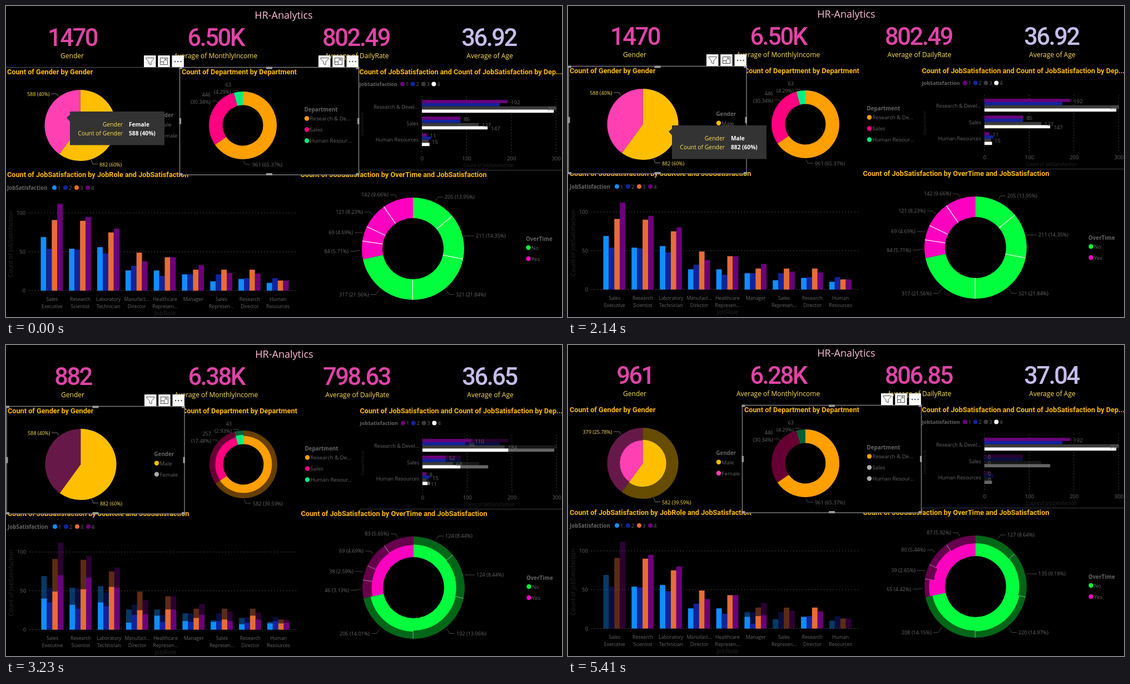
Recreate the animation shown at these times as an HTML page with a canvas. Size 1000x560 px, loop 6500 ms.

```html
<!DOCTYPE html>
<html lang="en">
<head>
<meta charset="utf-8">
<title>HR-Analytics</title>
<style>
  html, body { margin: 0; width: 100%; height: 100%; overflow: hidden; background: #000; }
  canvas { display: block; }
</style>
</head>
<body>
<canvas id="stage" width="1000" height="560"></canvas>
<script>
const ctx = document.getElementById('stage').getContext('2d');
const SANS = '"Open Sans", "Noto Sans", sans-serif';
const DIN = 'Roboto, sans-serif';
const GREY = '#666', DARK = '#262626', YELLOW = '#ffdf55', GOLD = '#ffb90a';
const TAU = Math.PI * 2, TOTAL = 1470, FADE = 0.4;

// Each data set: everyone, women only, and the Research & Development department.
const genders = { all: [882, 588], female: [0, 588], rd: [582, 379] };
const departments = { all: [961, 446, 63], female: [379, 189, 20], rd: [961, 0, 0] };
const overtime = {
  all: [205, 211, 321, 317, 84, 69, 121, 142],
  female: [81, 87, 129, 111, 38, 31, 52, 59],
  rd: [127, 135, 220, 208, 65, 39, 80, 87],
};
const satisfaction = {
  all: [192, 174, 300, 295, 86, 86, 127, 147, 11, 20, 15, 17],
  female: [82, 78, 116, 103, 34, 34, 59, 62, 3, 5, 6, 6],
  rd: [192, 174, 300, 295, 0, 0, 0, 0, 0, 0, 0, 0],
};
const roles = {
  all: [69, 54, 91, 112, 54, 53, 90, 95, 56, 48, 75, 80, 26, 32, 49, 38, 26, 19, 43, 43,
    21, 21, 27, 33, 12, 21, 27, 23, 15, 16, 27, 22, 10, 16, 13, 13],
  female: [29, 19, 42, 42, 22, 26, 38, 28, 21, 18, 20, 26, 17, 13, 24, 18, 8, 9, 17, 17,
    10, 11, 12, 14, 2, 10, 14, 12, 8, 7, 9, 9, 2, 5, 5, 4],
};
const managersInRd = [15, 6, 16, 17];
roles.rd = roles.all.map((v, i) => {
  const role = i >> 2;
  return role === 5 ? managersInRd[i % 4] : [0, 6, 8].includes(role) ? 0 : v;
});
const roleNames = ['Sales Executive', 'Research Scientist', 'Laboratory Technician',
  'Manufact... Director', 'Healthcare Represen...', 'Manager', 'Sales Represen...',
  'Research Director', 'Human Resources'];

const everyone = ['1470', '6.50K', '802.49', '36.92'];
const scenes = [
  { ms: 1050, dx: 0, dy: 0, mode: 'all', selected: 'department', bars: [0, 314], cards: everyone,
    tip: { x: 115, y: 190, w: 170, key: 95, color: YELLOW, rows: [['Gender', 'Female'], ['Count of Gender', '588 (40%)']] } },
  { ms: 1090, dx: -1, dy: -2, mode: 'female', selected: 'gender', bars: [0],
    cards: ['588', '6.69K', '808.27', '37.33'] },
  { ms: 1090, dx: 1, dy: -2, mode: 'all', selected: 'gender', bars: [0], cards: everyone,
    tip: { x: 187, y: 215, w: 170, key: 95, color: YELLOW, rows: [['Gender', 'Male'], ['Count of Gender', '882 (60%)']] } },
  { ms: 1090, dx: 1, dy: 0, mode: 'male', selected: 'gender', bars: [0],
    cards: ['882', '6.38K', '798.63', '36.65'] },
  { ms: 1090, dx: 1, dy: 0, mode: 'all', selected: 'gender', bars: [0, 314], cards: everyone,
    tip: { x: 503, y: 189, w: 267, key: 117, color: '#ddd', rows: [['Department', 'Research & Development'], ['Count of Department', '961 (65.37%)']] } },
  { ms: 1090, dx: 1, dy: -2, mode: 'rd', selected: 'department', bars: [314],
    cards: ['961', '6.28K', '806.85', '37.04'] },
];
const LOOP = scenes.reduce((sum, s) => sum + s.ms, 0);

const pick = (set, mode) =>
  mode === 'male' ? set.all.map((v, i) => v - set.female[i]) : set[mode];
const percent = v => `(${(v / TOTAL * 100).toFixed(2).replace('.00', '')}%)`;

function text(str, x, y, size, color, { align = 'left', weight = 400, family = SANS, spacing = 0 } = {}) {
  ctx.font = `${weight} ${size}px ${family}`;
  ctx.letterSpacing = spacing + 'px';
  ctx.textAlign = align;
  ctx.fillStyle = color;
  ctx.fillText(str, x, y + size * 0.36);
}

function verticalText(str, x, y, size) {
  ctx.save();
  ctx.translate(x, y);
  ctx.rotate(-Math.PI / 2);
  text(str, 0, 0, size, DARK, { align: 'center' });
  ctx.restore();
}

const heading = (str, x, y) => text(str, x, y, 12.7, GOLD, { weight: 600, family: DIN });

function rect(x, y, w, h, color, alpha = 1) {
  ctx.globalAlpha = alpha;
  ctx.fillStyle = color;
  ctx.fillRect(x, y, w, h);
  ctx.globalAlpha = 1;
}

function line(points, color = '#484848', width = 1, dash = []) {
  ctx.beginPath();
  points.forEach(([x, y]) => ctx.lineTo(x, y));
  ctx.strokeStyle = color;
  ctx.lineWidth = width;
  ctx.setLineDash(dash);
  ctx.stroke();
  ctx.setLineDash([]);
}

function dot(x, y, color, r = 4) {
  ctx.beginPath();
  ctx.arc(x, y, r, 0, TAU);
  ctx.fillStyle = color;
  ctx.fill();
}

function legend(title, names, x, y, colors, offset = 0) {
  text(title, x, y, 9.8, GREY, { weight: 700 });
  names.forEach((name, i) => {
    dot(x + 4.5, y + 16 + offset + i * 20, colors[i], 4.2);
    text(name, x + 10, y + 16.5 + offset + i * 20, 9.7, GREY);
  });
}

function numberLegend(x, y, firstDot, step, size, colors) {
  text('JobSatisfaction', x, y, size, GREY, { weight: 700 });
  colors.forEach((color, i) => {
    dot(firstDot + i * step, y - 0.5, color);
    text(i + 1, firstDot + 6 + i * step, y, size, GREY);
  });
}

// Faded full slices with the highlighted share growing from the inner radius.
function ring(cx, cy, inner, outer, all, part, colors, separators = []) {
  const sum = all.reduce((a, b) => a + b);
  const full = all.every((v, i) => v === part[i]);
  const slices = (values, alpha) => {
    let angle = -TAU / 4;
    all.forEach((v, i) => {
      const end = angle + v / sum * TAU;
      const r = inner + (outer - inner) * values[i] / v;
      if (values[i]) {
        ctx.globalAlpha = alpha;
        ctx.beginPath();
        ctx.arc(cx, cy, r, angle, end);
        ctx.arc(cx, cy, inner, end, angle, true);
        ctx.fillStyle = colors[i];
        ctx.fill();
      }
      angle = end;
    });
    angle = -TAU / 4;
    all.forEach((v, i) => {
      angle += v / sum * TAU;
      if (!separators.includes(i) || (!full && alpha === 1)) return;
      const [c, s] = [Math.cos(angle), Math.sin(angle)];
      line([[cx + inner * c, cy + inner * s], [cx + outer * c, cy + outer * s]], '#fff', 1.2);
    });
    ctx.globalAlpha = 1;
  };
  if (!full) slices(all, FADE);
  slices(part, 1);
}

function cards(scene) {
  text('HR-Analytics', 499.5, 17, 18, '#ffc0d4', { align: 'center' });
  const labels = ['Gender', 'Average of MonthlyIncome', 'Average of DailyRate', 'Average of Age'];
  [[119.5, 119], [377, 377], [629.5, 631], [868.5, 870]].forEach(([valueX, labelX], i) => {
    text(scene.cards[i], valueX, 56.5, 43.5, i < 3 ? '#e044a7' : '#c6bcea',
      { align: 'center', family: DIN, weight: 500, spacing: -2.5 });
    text(labels[i], labelX, 90, 12, YELLOW, { align: 'center' });
  });
}

function genderChart({ mode, selected }) {
  const colors = ['#ffbf00', '#ff40b3'];
  const own = mode === 'female' || mode === 'male';
  const part = pick(genders, mode);
  const shown = own ? genders.all : part;
  if (selected === 'gender') selectionBox(0, 110.5, 320, 193.5);
  heading('Count of Gender by Gender', 2, 118.3);
  ring(133.5, 215, 0, 64, genders.all, part, colors);
  const label = v => `${v} ${percent(v)}`;
  text(label(shown[1]), 78.5, 159, 8.9, YELLOW, { align: 'right', weight: 500 });
  line([[81, 158], [91, 158], [94, 163]], '#777');
  text(label(shown[0]), 168, 285.5, 8.9, YELLOW, { weight: 500 });
  line([[153, 277], [156, 284.5], [165, 284.5]], '#777');
  legend('Gender', ['Male', 'Female'], 265.5, 196, colors.map((c, i) => own && !part[i] ? '#aaa' : c), 0.7);
}

function departmentChart({ mode, selected }) {
  const colors = ['#ff9f00', '#ff0080', '#00f080'];
  const own = mode === 'rd';
  const part = pick(departments, mode);
  const shown = own ? departments.all : part;
  if (selected === 'department') selectionBox(312.5, 110.5, 322, 193.5);
  heading('Count of Department by Department', 316, 118.3);
  ring(426, 215, 36.5, 61, departments.all, part, colors);
  text(`${shown[0]} ${percent(shown[0])}`, 443, 285.5, 9.1, GREY);
  line([[427, 278], [430, 285], [440, 285]]);
  [[1, 368, 160], [2, 405, 142]].forEach(([i, x, y]) => {
    text(shown[i], x, y, 9.1, GREY, { align: 'right' });
    text(percent(shown[i]), x, y + 12.5, 9.1, GREY, { align: 'right' });
  });
  line([[370, 171], [378, 171], [381, 175]]);
  line([[407, 152], [416, 152], [418, 154]]);
  legend('Department', ['Research & De...', 'Sales', 'Human Resour...'], 536.5, 186.5,
    colors.map((c, i) => own && !part[i] ? '#b0b0b0' : c));
}

function satisfactionChart({ mode }) {
  const colors = ['#6b007b', '#12239e', '#3a3a3a', '#fff'];
  const labelled = mode === 'male' ? [0, 1, 2, 4, 6, 8, 9, 11]
    : mode === 'all' ? [0, 2, 4, 6, 7, 8, 10] : [0, 2, 4, 6, 8, 10];
  const x0 = 748, unit = 0.804;
  const part = pick(satisfaction, mode);
  heading('Count of JobSatisfaction and Count of JobSatisfaction by Dep...', 635.5, 118.3);
  numberLegend(635.5, 141, 713, 18.8, 9.1, colors);
  for (let v = 0; v <= 300; v += 100) {
    const x = x0 + v * unit;
    line([[x, 162], [x, 267]], '#555', 1, [1.5, 4]);
    text(v, x + 0.5, 275, 9.4, GREY, { align: 'center' });
  }
  ['Research & Devel...', 'Sales', 'Human Resources'].forEach((name, i) =>
    text(name, 742, 181.5 + i * 29.8, 9.1, GREY, { align: 'right' }));
  const top = i => 169.2 + (i >> 2) * 30 + (i % 4) * 5.75;
  satisfaction.all.forEach((v, i) => {
    if (part[i] < v) rect(x0, top(i), v * unit, 5.75, colors[i % 4], FADE);
    rect(x0, top(i), part[i] * unit, 5.75, colors[i % 4]);
  });
  labelled.forEach(i =>
    text(part[i], Math.min(x0 + part[i] * unit + 6, 974), top(i) + 4.3, 9.6, GREY));
  verticalText('Department', 640.5, 213, 7.7);
  text('Count of JobSatisfaction', 868.5, 287.5, 8.2, DARK, { align: 'center' });
  line([[635, 295.5], [1000, 295.5]], '#3c3c3c');
}

function roleChart({ mode }) {
  const colors = ['#118dff', '#12239e', '#e66c37', '#6b007b'];
  const base = 512.5, unit = 1.397;
  const part = pick(roles, mode);
  heading('Count of JobSatisfaction by JobRole and JobSatisfaction', 2, 303.8);
  numberLegend(2, 327.5, 87, 20, 9.7, colors);
  [0, 50, 100].forEach(v => {
    line([[41, base - v * unit], [524, base - v * unit]], '#555', 1, [1.5, 4]);
    text(v, 35, base - v * unit, 9.4, GREY, { align: 'right' });
  });
  roles.all.forEach((v, i) => {
    const x = 62.5 + (i >> 2) * 50.8 + (i % 4) * 9.9;
    if (part[i] < v) rect(x, base - v * unit, 9.9, v * unit, colors[i % 4], FADE);
    rect(x, base - part[i] * unit, 9.9, part[i] * unit, colors[i % 4]);
  });
  roleNames.forEach((name, i) => name.split(' ').forEach((word, row) =>
    text(word, 82.7 + i * 50.8, 528 + row * 13.3, 8.7, GREY, { align: 'center' })));
  verticalText('Count of JobSatisfaction', 8, 428.5, 10.8);
  text('JobRole', 286, 553.5, 11, DARK, { align: 'center' });
}

function overtimeChart({ mode }) {
  const [cx, cy, outer] = [732, 437, 92];
  const colors = overtime.all.map((_, i) => i < 4 ? '#00ff3c' : '#ff00c0');
  const places = [[789, 344], [845, 414], [809, 519.5], [653, 519.5],
    [616, 441.5], [624, 408], [642, 371], [688, 340]];
  const part = pick(overtime, mode);
  heading('Count of JobSatisfaction by OverTime and JobSatisfaction', 529.5, 303.8);
  ring(cx, cy, 55, outer, overtime.all, part, colors, [0, 1, 2, 4, 5, 6]);
  let before = 0;
  places.forEach(([x, y], i) => {
    const side = i < 3 ? 1 : -1;
    const angle = (before + overtime.all[i] / 2) / TOTAL * TAU;
    before += overtime.all[i];
    line([[cx + (outer + 3) * Math.sin(angle), cy - (outer + 3) * Math.cos(angle)],
      [x - side * 12, y], [x - side * 3, y]]);
    text(`${part[i]} ${percent(part[i])}`, x, y, 9.1, GREY, { align: side > 0 ? 'left' : 'right' });
  });
  legend('OverTime', ['No', 'Yes'], 935, 419, [colors[0], colors[4]]);
}

function selectionBox(x, y, w, h) {
  rect(x, y, w, h, '#000');
  ctx.strokeStyle = '#808080';
  ctx.lineWidth = 1.4;
  ctx.strokeRect(x, y, w, h);
  for (const fx of [0, 0.5, 1]) for (const fy of [0, 0.5, 1]) {
    if (fx === 0.5 && fy === 0.5) continue;
    const hw = fy === 0.5 ? 3.5 : fx === 0.5 ? 11 : 6;
    const hh = fy === 0.5 ? 11 : 4;
    rect(x - 1 + fx * (w + 2 - hw), y - 1 + fy * (h + 2 - hh), hw, hh, '#999');
  }
}

function buttonBar(x) {
  const ink = '#555';
  for (let i = 0; i < 3; i++) rect(x + 248 + i * 25.2, 89, 21.5, 21, '#fafafa');
  line([[252, 93.5], [266, 93.5], [266, 95], [261, 100.5], [261, 106], [257, 104], [257, 100.5],
    [252, 95], [252, 93.5]].map(([px, y]) => [x + px, y]), ink);
  ctx.strokeRect(x + 277.5, 93.5, 13, 12);
  line([[x + 277.5, 100.5], [x + 283.5, 100.5], [x + 283.5, 105.5]], ink);
  line([[x + 283, 100], [x + 288, 95.5]], ink);
  line([[x + 284.5, 95.5], [x + 288, 95.5], [x + 288, 99]], ink);
  for (let i = 0; i < 3; i++) dot(x + 304 + i * 5.3, 100, ink, 1.2);
}

function tooltip({ x, y, w, key, color, rows }) {
  rect(x, y, w, 60.5, '#333');
  ctx.beginPath();
  ctx.moveTo(x, y + 6);
  ctx.lineTo(x - 6, y + 11);
  ctx.lineTo(x, y + 18);
  ctx.fill();
  rows.forEach(([name, value], i) => {
    text(name, x + key, y + 23 + i * 16, 10.4, color, { align: 'right' });
    text(value, x + key + 11, y + 23 + i * 16, 10.2, '#fff', { weight: 700 });
  });
}

function draw(scene) {
  ctx.setTransform(1, 0, 0, 1, 0, 0);
  rect(0, 0, 1000, 560, '#000');
  ctx.translate(scene.dx, scene.dy);
  const pair = [genderChart, departmentChart];
  if (scene.selected === 'gender') pair.reverse();
  [cards, satisfactionChart, roleChart, overtimeChart, ...pair].forEach(part => part(scene));
  if (scene.bars.length > 1) {
    const x = scene.selected === 'gender' ? 321 : 0;
    line([[x, 110.5], [x + 313, 110.5]], '#555');
  }
  scene.bars.forEach(buttonBar);
  ctx.setTransform(1, 0, 0, 1, 0, 0);
  if (scene.tip) tooltip(scene.tip);
}

const start = performance.now();
function tick() {
  let t = (performance.now() - start) % LOOP;
  draw(scenes.find(s => (t -= s.ms) < 0) || scenes[0]);
  requestAnimationFrame(tick);
}
tick();
</script>
</body>
</html>
```
